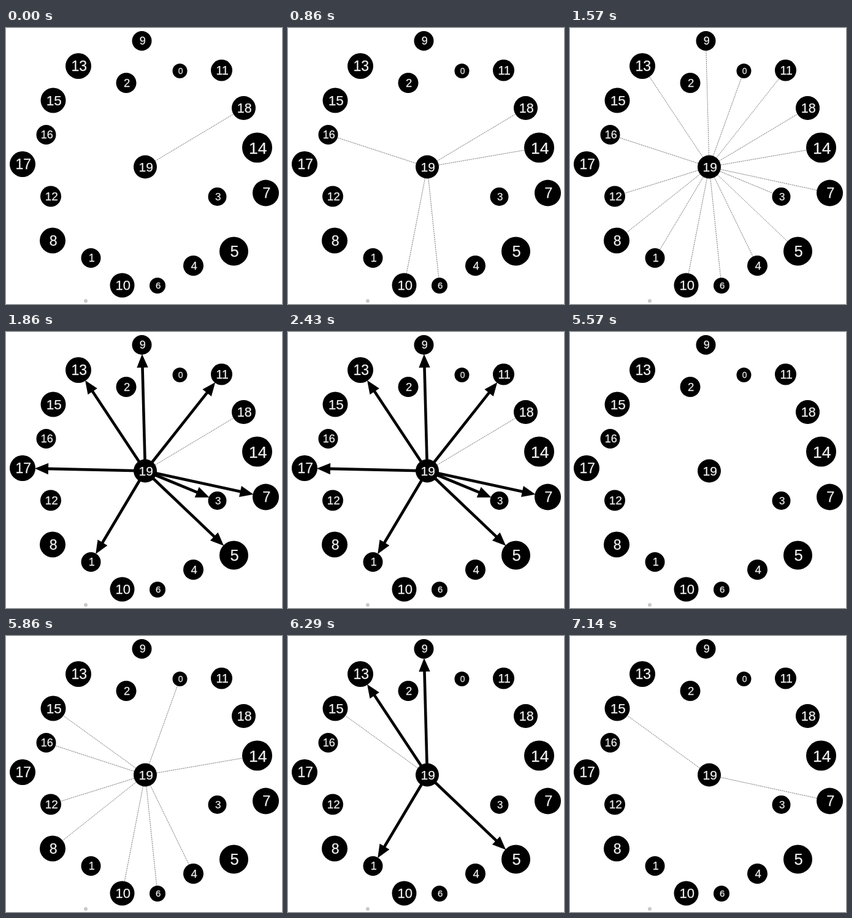
Write an HTML page that moves like this. It is 450x450 px and loops after 8 s.

```html
<!DOCTYPE html>
<html lang="en">
<head>
<meta charset="utf-8">
<title>Node messages</title>
<style>
  html, body { margin: 0; width: 100%; height: 100%; overflow: hidden; background: #fff; }
  svg { display: block; width: 100%; height: 100%; }
  text {
    font-family: "Liberation Sans", Arial, sans-serif; text-anchor: middle;
    fill: #f0f0f0; stroke: #f0f0f0; stroke-width: .25;
  }
  .thin { stroke: #555; stroke-width: .8; stroke-dasharray: 2 1.3; }
  .arrow line { stroke: #000; stroke-width: 4.6; }
</style>
</head>
<body>
<svg id="stage" viewBox="0 0 450 450">
  <circle cx="130" cy="445" r="3" fill="#c8c8c8"/>
</svg>
<script>
const LOOP = 8000;
const HUB = 19;

// x, y, radius; the index is the label
const nodes = [
  [283.5, 70, 12], [138.5, 375, 16], [196, 89.5, 16.5], [344.5, 275, 15],
  [305.5, 387.5, 16.5], [371.5, 364, 23.5], [247, 420, 13], [423.5, 269, 21.5],
  [76, 346.5, 21], [221.5, 21, 16], [189.5, 419.5, 20], [351.5, 69, 17.5],
  [73, 274.5, 17], [118, 62, 21], [409.5, 195, 24.5], [77, 118, 20.5],
  [65.5, 174, 16], [27, 222, 21], [387.5, 130.5, 19.5], [227, 226.5, 19]
];

const none = () => false;
const only = (...ids) => id => ids.includes(id);
const not = (...ids) => id => !ids.includes(id);
const either = (...rules) => id => rules.some(rule => rule(id));
const both = (...rules) => id => rules.every(rule => rule(id));
const mod = (n, rest) => id => id % n === rest;

const evens = both(mod(2, 0), not(2, 18));
const firstEvens = both(mod(4, 2), not(2));

// start time, rule for thin links, rule for arrows
const steps = [
  [0, only(18), none],
  [710, firstEvens, none],
  [860, either(firstEvens, only(16)), none],
  [1290, not(2, 15, 17), none],
  [1860, only(18), both(mod(2, 1), not(15))],
  [2570, only(15, 18), none],
  [5570, none, none],
  [5710, either(evens, only(15)), none],
  [6290, only(15), both(mod(4, 1), not(17))],
  [6710, only(15, 7), none]
];

const stage = document.getElementById("stage");

function add(parent, tag, attrs, text) {
  const el = document.createElementNS("http://www.w3.org/2000/svg", tag);
  for (const key in attrs) el.setAttribute(key, attrs[key]);
  if (text !== undefined) el.textContent = text;
  return parent.appendChild(el);
}

function makeLink([x, y, r]) {
  const [hx, hy, hr] = nodes[HUB];
  const dx = x - hx, dy = y - hy;
  const end = Math.hypot(dx, dy) - r;
  const angle = Math.atan2(dy, dx) * 180 / Math.PI;
  const transform = `translate(${hx} ${hy}) rotate(${angle})`;
  const thin = add(stage, "line", { class: "thin", transform, x1: hr, x2: end });
  const arrow = add(stage, "g", { class: "arrow", transform });
  add(arrow, "line", { x2: end - 18 });
  add(arrow, "path", { d: `M${end + 1} 0l-22 -9.2v18.4z` });
  return { thin, arrow };
}

function makeNode([x, y, r], id) {
  const size = r + 2;
  add(stage, "circle", { cx: x, cy: y, r });
  add(stage, "text", { x: x + 1.2, y: y + size * 0.36, "font-size": size }, id);
}

const links = nodes.slice(0, HUB).map(makeLink);
nodes.forEach(makeNode);

function show(el, on) {
  el.setAttribute("visibility", on ? "visible" : "hidden");
}

function render(t) {
  const [, thin, arrow] = steps.findLast(step => step[0] <= t);
  links.forEach((link, id) => {
    show(link.thin, thin(id));
    show(link.arrow, arrow(id));
  });
}

const start = performance.now();
function tick() {
  render((performance.now() - start) % LOOP);
  requestAnimationFrame(tick);
}
tick();
</script>
</body>
</html>
```
